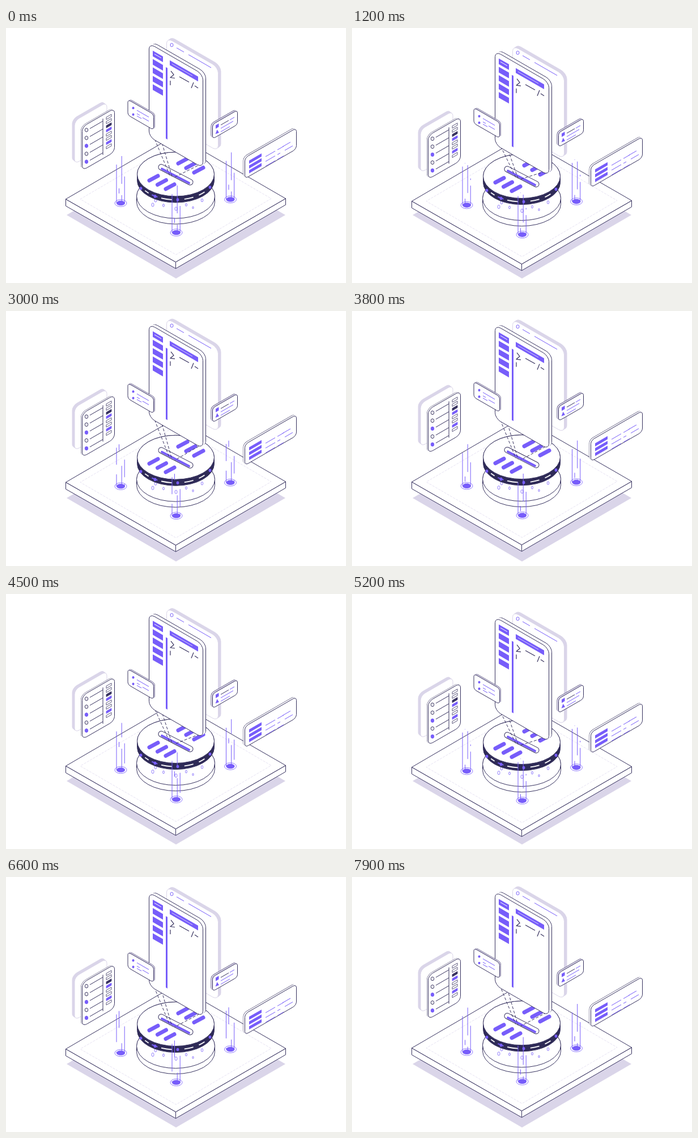
Animation, 600 px wide and 450 px high, one loop 8000 ms. Source, as an HTML page with a canvas:

```html
<!DOCTYPE html>
<html>
<head>
<meta charset="utf-8">
<style>
html, body { margin: 0; height: 100%; overflow: hidden; background: #fff; }
canvas { display: block; width: 600px; height: 450px; }
</style>
</head>
<body>
<canvas id="c"></canvas>
<script>
const canvas = document.getElementById('c');
const ratio = window.devicePixelRatio || 1;
canvas.width = 600 * ratio;
canvas.height = 450 * ratio;
const g = canvas.getContext('2d');

const INK = '#37325f', PURPLE = '#775dfa', PALE = '#dad5e9', WHITE = '#fff';
const SLOPE = 0.577, CYCLE = 4000, CX = 299.5;

function paint(fill, stroke, width = 1) {
  if (fill) { g.fillStyle = fill; g.fill(); }
  if (stroke) { g.strokeStyle = stroke; g.lineWidth = width; g.stroke(); }
}

function poly(points, fill, stroke, width) {
  g.beginPath();
  points.forEach(([x, y]) => g.lineTo(x, y));
  g.closePath();
  paint(fill, stroke, width);
}

function line(color, width, ...xy) {
  g.beginPath();
  for (let i = 0; i < xy.length; i += 2) g.lineTo(xy[i], xy[i + 1]);
  paint(null, color, width);
}

function oval(x, y, rx, ry, fill, stroke, width) {
  g.beginPath();
  g.ellipse(x, y, rx, ry, 0, 0, 7);
  paint(fill, stroke, width);
}

// Upright rectangle sheared along an isometric axis
function slab(x, y, w, h, slope, r, fill, stroke, width) {
  g.save();
  g.transform(1, slope, 0, 1, x, y);
  g.beginPath();
  g.roundRect(0, 0, w, h, r);
  g.restore();
  paint(fill, stroke, width);
}

function card(x, y, w, h, slope, r, dx, dy, side, edge) {
  for (let k = 1; k > 0; k -= 0.25) slab(x + dx * k, y + dy * k, w, h, slope, r, side, k === 1 ? edge : side);
  slab(x, y, w, h, slope, r, WHITE, edge);
}

function shifted(dy, draw) {
  g.save();
  g.translate(0, dy);
  draw();
  g.restore();
}

// Line running along the card's slope
const along = (x, y, w, slope, color = PURPLE, width = 1) =>
  line(color, width, x, y, x + w, y + w * slope);

const wave = (t, peak, amp, mid) => mid + amp * Math.cos((t - peak) / CYCLE * 2 * Math.PI);

function platform() {
  poly([[105.5, 302], [299.5, 413], [493.5, 301], [493.5, 312], [299.5, 424.5], [105.5, 314]], WHITE, INK);
  poly([[105.5, 302], [299.5, 189], [493.5, 301], [299.5, 413]], WHITE, INK);
  line(INK, 1, 299.5, 413, 299.5, 424);
  g.setLineDash([4, 2]);
  poly([[131, 302], [300, 203], [468, 301], [300, 400]], null, '#e0dbef', 0.8);
  g.setLineDash([]);
}

function drum(cy, depth, rx, ry, fill) {
  g.beginPath();
  g.ellipse(CX, cy + depth, rx, ry, 0, 0, Math.PI);
  g.ellipse(CX, cy, rx, ry, 0, Math.PI, 2 * Math.PI);
  g.closePath();
  paint(fill, INK);
  oval(CX, cy, rx, ry, WHITE, INK);
}

function discs() {
  drum(297, 10, 69, 39, WHITE);
  [[264, 304, 2], [259, 312, 2], [278, 313, 1.5], [300, 319, 2], [318, 312, 1.5], [330, 317, 1.2], [346, 304, 1.7]]
    .forEach(([x, y, r]) => oval(x, y, r, r * 1.6, WHITE, PURPLE, 0.8));
  drum(258, 11, 68, 39, '#2f2b57');

  g.lineCap = 'round';
  const arcs = [[0.72, 0.9, WHITE], [1.1, 1.33, WHITE], [1.68, 1.95, WHITE], [2.08, 2.24, PURPLE], [2.38, 2.5, WHITE]];
  arcs.forEach(([a, b, color]) => {
    g.beginPath();
    g.ellipse(CX, 264, 67, 39, 0, a, b);
    paint(null, color, 1.8);
  });
  [[238, 283], [263, 297], [303, 303], [360, 281]].forEach(([x, y]) => oval(x, y, 2.4, 2.8, PURPLE));

  for (let i = 0; i < 3; i++) {
    line(PURPLE, 7, 253 + 14.5 * i, 269 + 7.5 * i, 268 + 14.5 * i, 261 + 7.5 * i);
    line(PURPLE, 7, 304 + 14 * i, 239 + 8 * i, 320 + 14 * i, 230.5 + 8 * i);
  }
  line(INK, 11, 274, 245.5, 325, 272);
  line(WHITE, 9, 274, 245.5, 325, 272);
  line(PURPLE, 4, 275, 248.5, 323, 273.5);
  g.lineCap = 'butt';
}

// Each strand: x, top, then dash spans that climb and repeat every 188 px
const RISE = 188;
const strands = [
  [-7.5, -68, [-68, 103]],
  [-3, -74, [-26, -17], [45, 78]],
  [1.7, -83, [-83, -34], [-14, 35]],
  [6.7, -47, [-51, 12], [22, 125]]
];

function beams(x, y, t) {
  for (const [dx, top, ...spans] of strands)
    for (const [a, b] of spans)
      for (let k = -1; k < 3; k++) {
        const move = RISE * (k - t / CYCLE);
        const from = Math.max(a + move, top), to = Math.min(b + move, 0);
        if (to > from) line(PURPLE, 1, x + dx, y + from, x + dx, y + to);
      }
}

function backPanel() {
  card(283.5, 17, 91, 148, SLOPE, 10, 4.5, -3, PALE, PALE);
  oval(292.5, 30, 2.5, 3, WHITE, PURPLE);
  along(301, 35, 13, SLOPE);
  along(322, 47, 40, SLOPE);
}

function mainPanel() {
  card(252.5, 27, 95, 165, SLOPE, 10, 5, -3, WHITE, INK);
  for (let i = 0; i < 5; i++) slab(259, 40 + 14.8 * i, 18, 10, SLOPE, 0, PURPLE);
  along(262, 46, 12, SLOPE, WHITE);
  slab(282, 69, 3, 126, SLOPE, 0, PURPLE);
  slab(289, 57, 50, 8.5, SLOPE, 0, PURPLE);
  along(293, 63.5, 36, SLOPE, '#d5ccff');
  line(INK, 1.2, 291, 76, 296, 82.5, 290, 87.5, 298, 88.5);
  line(INK, 1.2, 306, 86, 323, 95.5);
  line(INK, 1.2, 331, 96, 327, 106);
  line(INK, 1.2, 333, 102, 339, 106);
  line(INK, 1.2, 290, 93, 290, 101);
}

function listCards() {
  card(121, 164, 57, 76, -SLOPE, 8, -4, -3, PALE, PALE);
  card(134.5, 174.5, 57, 77, -SLOPE, 8, -2, -1, WHITE, INK);
  for (let i = 0; i < 5; i++) {
    const y = 180 + 14 * i, full = i === 2 || i === 4;
    oval(142, y, 2.7, 3.2, full ? PURPLE : WHITE, full ? PURPLE : INK);
    along(148, y - 2.5, 23, -SLOPE, INK);
  }
  line(INK, 1, 171, 160, 171, 224);
  const fills = { 2: INK, 3: PURPLE, 6: PURPLE };
  for (let i = 0; i < 8; i++) slab(177, 157.5 + 7.4 * i, 9, 4, -SLOPE, 0, fills[i] || WHITE, fills[i] || INK, 0.8);
}

function wideCard() {
  card(421.5, 229, 91, 37, -SLOPE, 6, -2.5, -1.5, WHITE, INK);
  for (let i = 0; i < 3; i++) {
    const y = 227 + 8.5 * i;
    slab(429, 234 + 8.5 * i, 22, 5.5, -SLOPE, 0, PURPLE);
    along(458, y, 17, -SLOPE);
    along(479, y - 12, i === 1 ? 5 : 11, -SLOPE);
    if (i < 2) along(488 + 4 * i, y - 17.5 - 2 * i, 14, -SLOPE);
  }
}

function smallCards() {
  card(215, 126, 45.5, 27.5, SLOPE, 5, 2, -1.2, PALE, INK);
  [141, 152.5].forEach(y => oval(224.5, y, 2, 2.2, PURPLE));
  along(231, 145, 21, SLOPE);
  along(231, 155, 8, SLOPE);
  along(241, 158, 11, SLOPE);
  along(231, 151, 5, SLOPE);

  card(364.5, 170, 44, 25.5, -SLOPE, 5, -2.5, -1.5, PALE, INK);
  slab(370, 171.5, 5.5, 6, -SLOPE, 0, PURPLE);
  poly([[372.5, 179], [376, 184.5], [369.5, 187]], PURPLE);
  along(379, 171, 14, -SLOPE, INK);
  along(395, 162, 8, -SLOPE);
  along(379, 177, 22, -SLOPE);
  along(379, 183, 16, -SLOPE);
}

function tethers(t, base, main) {
  g.setLineDash([5, 3]);
  g.lineDashOffset = -80 * t / CYCLE;
  [[289, 260, 259, 188], [293, 262, 272, 192], [298, 263, 352, 236]].forEach(([x, y, px, py]) =>
    line(INK, 1, x, y + base, px, py + main));
  g.setLineDash([]);
}

function draw(time) {
  const t = Math.floor(time / 100) * 100 % CYCLE;
  const main = wave(t, 1300, 9.5, 4.3);
  const base = wave(t, 1550, 2.2, 1.7);
  const side = wave(t, 1800, 10, 9.5);
  const small = wave(t, 1550, 9, 7);
  const rings = [[202.5, 309], [396, 302.5], [300.5, 361]];

  g.setTransform(ratio, 0, 0, ratio, 0, 0);
  g.fillStyle = WHITE;
  g.fillRect(0, 0, 600, 450);
  g.lineJoin = 'round';

  poly([[107, 330], [300, 218], [493, 330], [300, 442]], PALE);
  shifted(base, () => {
    platform();
    for (const [x, y] of rings) {
      oval(x, y, 10.5, 6.2, WHITE, PURPLE, 0.8);
      oval(x, y, 7.5, 4.3, PURPLE);
    }
    discs();
  });
  shifted(main, backPanel);
  tethers(t, base, main);
  shifted(main, mainPanel);
  shifted(side, () => { listCards(); wideCard(); });
  shifted(small, smallCards);
  shifted(base, () => rings.forEach(([x, y]) => beams(x, y, t)));
}

const start = performance.now();
function frame() {
  draw(performance.now() - start);
  requestAnimationFrame(frame);
}
frame();
</script>
</body>
</html>
```
